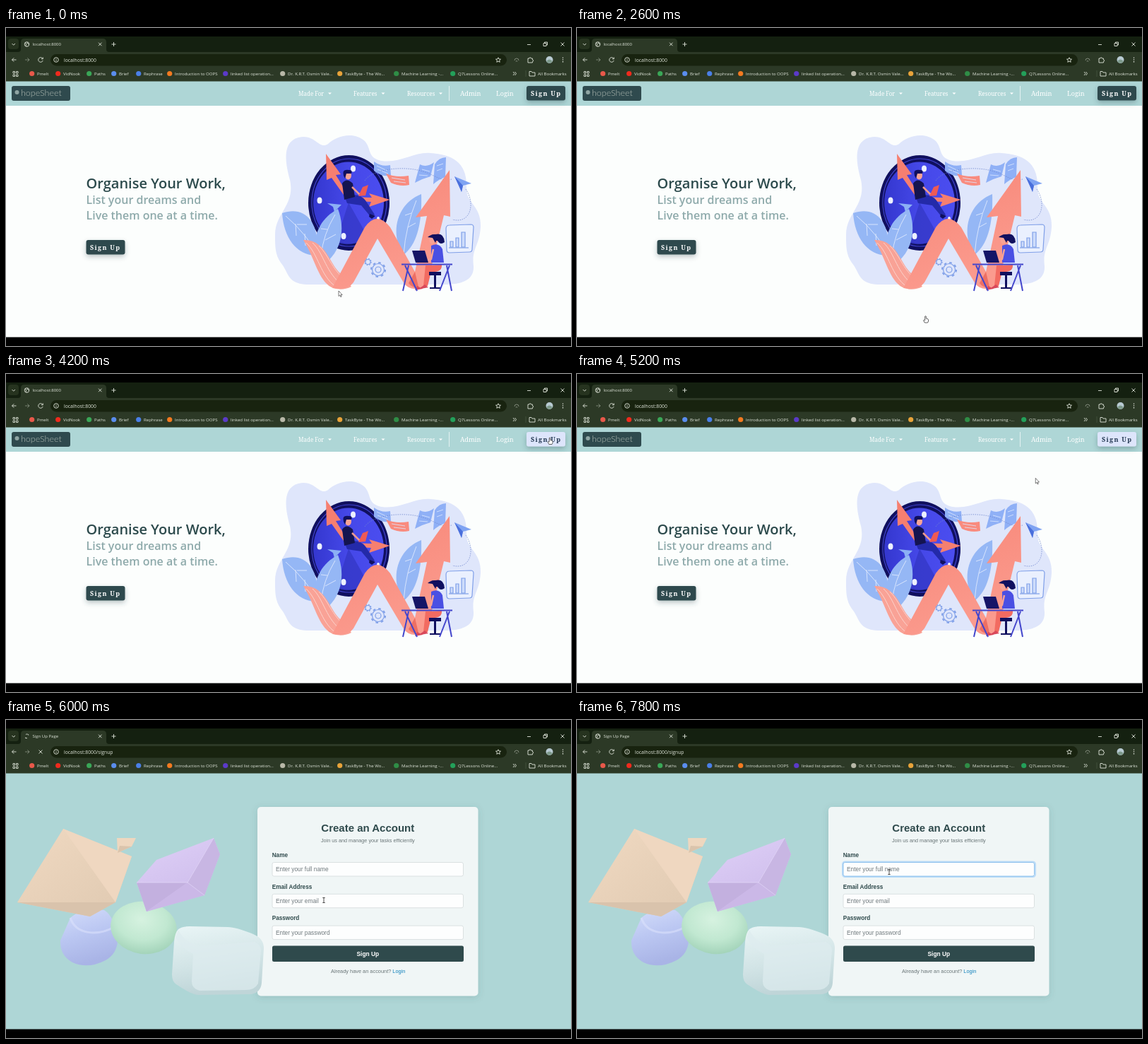
Recreate the animation shown at these times as an HTML page. Size 800 by 450 pixels, loop 8 s.

```html
<!DOCTYPE html>
<html lang="en">
<head>
<meta charset="utf-8">
<title>Sign up walkthrough</title>
<style>
html, body { margin: 0; width: 100%; height: 100%; overflow: hidden; background: #000; }
svg { display: block; width: 800px; height: 450px; }
text { white-space: pre; }
.ui { font-family: "Open Sans", "Noto Sans", sans-serif; font-size: 6.1px; fill: #dfe5da; }
.serif { font-family: "Noto Serif", serif; fill: #fff; }
.btn { font: 700 9px "Noto Serif", serif; letter-spacing: 1.3px; fill: #fff; }
.head { font-family: "Open Sans", "Noto Sans", sans-serif; font-weight: 600; }
.form { font-family: "Liberation Sans", Arial, sans-serif; }
.line { fill: none; stroke: #dfe5da; stroke-width: .9; }
</style>
</head>
<body>
<svg viewBox="0 0 800 450">
<defs>
  <filter id="shadow" x="-20%" y="-40%" width="140%" height="200%"><feDropShadow dx="0" dy="3" stdDeviation="3.5" flood-color="#2f4a4e" flood-opacity=".32"/></filter>
  <filter id="soft" x="-10%" y="-10%" width="120%" height="120%"><feDropShadow dx="0" dy="2" stdDeviation="5" flood-color="#35595b" flood-opacity=".18"/></filter>
  <linearGradient id="sand" x2="1" y2="1"><stop stop-color="#f0d9c1"/><stop offset="1" stop-color="#dfc9b1"/></linearGradient>
  <linearGradient id="lilac" x2=".5" y2="1"><stop stop-color="#dfd0f7"/><stop offset="1" stop-color="#cdbceb"/></linearGradient>
  <linearGradient id="blue" x2=".3" y2="1"><stop stop-color="#d3dcfa"/><stop offset=".5" stop-color="#bbc7f2"/><stop offset="1" stop-color="#a9b4e6"/></linearGradient>
  <radialGradient id="mint" cx=".45" cy=".35" r=".65"><stop stop-color="#d6f2e0"/><stop offset=".6" stop-color="#c1e8d1"/><stop offset="1" stop-color="#a4d4ba"/></radialGradient>
  <linearGradient id="ice" x2=".2" y2="1"><stop stop-color="#e9f5f6"/><stop offset=".6" stop-color="#d2e4e6"/><stop offset="1" stop-color="#bfd5d8"/></linearGradient>
  <linearGradient id="coral" x2=".4" y2="1"><stop stop-color="#f78576"/><stop offset="1" stop-color="#fb9b8e"/></linearGradient>
  <linearGradient id="face" x2="1" y2="0"><stop stop-color="#3437cf"/><stop offset=".5" stop-color="#4548e8"/><stop offset="1" stop-color="#4b4df0"/></linearGradient>
</defs>

<rect width="800" height="450"/>

<g id="home">
  <rect y="75" width="800" height="362.500" fill="#fcfefd"/>
  <rect y="75" width="800" height="35" fill="#aed6d6"/>
  <rect x="8" y="82" width="83" height="21" rx="3" fill="#2f4a4e"/>
  <circle cx="15.500" cy="91" r="3" fill="#8fa5a3"/>
  <text x="21" y="96" style="font:300 12.500px Lato,sans-serif;fill:#b3bdb5">hopeSheet</text>
  <g id="nav" class="serif"></g>
  <path d="M627.500 82V103" stroke="#e3f1f1"/>
  <g id="join"><rect x="737" y="82" width="55" height="20.500" rx="3" filter="url(#shadow)"/><text class="btn" x="743" y="95.500">Sign Up</text></g>

  <g class="head">
    <text x="113.500" y="227" font-size="20" fill="#2c4a4c">Organise Your Work,</text>
    <g font-size="16" fill="#8eaaab"><text x="113.500" y="249">List your dreams and</text><text x="113.500" y="271">Live them one at a time.</text></g>
  </g>
  <rect x="113.500" y="300" width="55" height="20.500" rx="3" fill="#2f4a4e" filter="url(#shadow)"/>
  <text class="btn" x="119" y="313.500">Sign Up</text>

  <path fill="#dfe6fb" d="M381 294C380 262 410 251 402 215C395 190 391 161 414 155C438 149 443 173 456 164C468 152 493 146 508 160C518 171 511 184 532 188C557 192 578 175 601 177C633 179 653 191 652 225C651 249 673 250 672 282C670 310 659 311 662 337C663 358 644 363 620 363H425C397 361 401 346 389 332C381 321 381 309 381 294Z"/>
  <g id="clock">
    <ellipse cx="485.500" cy="247.500" rx="57.500" ry="67.500" fill="#10105f"/>
    <ellipse cx="486" cy="247" rx="53" ry="62" fill="none" stroke="#4144cf" stroke-width="1.200"/>
    <ellipse cx="485" cy="247.500" rx="50" ry="58" fill="url(#face)"/>
    <path d="M485 247L467 304Q494 311 512 295Z" fill="#3033bd" opacity=".6"/>
    <g fill="#edf1ff"><ellipse cx="491.500" cy="199" rx="3.500" ry="4.500"/><ellipse cx="444" cy="244" rx="3.500" ry="4.500"/><ellipse cx="478" cy="294.500" rx="3.500" ry="4.500"/><ellipse cx="527" cy="270" rx="2" ry="3"/></g>
    <path d="M455 248L475 250L465 260L463 253Z" fill="#8cb0f5"/>
  </g>
  <!-- clock hands -->
  <path fill="#f67f70" d="M453 178L474 207L467 208L482 232L478 236L461 212L454 215ZM543.500 243L514 234L518 240L483 239V244L517 246L514 253Z"/>
  <!-- seated man -->
  <path d="M480 240Q498 231 509 244L522 264L517 268L503 251L483 248Z" fill="#242aa9"/>
  <path d="M515 263L523 266L518 270L514 267Z" fill="#10105f"/>
  <path d="M476 220Q482 211 491 220L494 239L479 243Z" fill="#141450"/>
  <path d="M490 225L500 235L508 234" fill="none" stroke="#f49a8d" stroke-width="2.500"/>
  <ellipse cx="484.500" cy="208.500" rx="4.500" ry="6" fill="#f8a395"/>
  <path d="M478 209Q475 199 486 201Q491 201 489 206L482 206L480 213Z" fill="#10105f"/>
  <path d="M505 225L513 222L509 237L499 238Z" fill="#ee5a55"/>

  <!-- sheets of paper -->
  <path fill="#8fb0f6" d="M521 189Q532 197 544 194L545 209Q532 211 521 202ZM586 193Q596 198 606 190L601 210Q590 213 579 219ZM607 193Q613 183 623 183L622 211Q613 214 605 221Z"/>
  <path fill="#f98b7e" d="M538 206Q552 212 570 209L571 222Q558 225 545 219Z"/>
  <path d="M525 195L540 202M526 200L541 206M589 200L600 203M585 208L597 209M610 195L619 192M610 202L618 199M546 212L565 215M549 217L566 219" fill="none" stroke="#dce7fe" stroke-width=".8"/>
  <path d="M508 216C520 198 567 195 590 203C610 209 616 218 631 214M651 228C665 248 658 278 632 271" fill="none" stroke="#7188cf" stroke-width=".8" stroke-dasharray="1.500 1.500"/>
  <path d="M635 210L659 220L647 223L645 232L641 222Z" fill="#7fa3f2"/><path d="M635 210L647 223L645 232Z" fill="#4a6fdc"/>

  <!-- leaves -->
  <g fill="#95b7f5" stroke="#e8effe" stroke-width=".8">
    <path stroke="none" d="M391 262C421 252 439 271 441 304L438 322C411 321 393 296 391 262Z"/>
    <path stroke="none" d="M470 256C481 285 475 317 449 335L437 319C435 288 448 268 470 256Z"/>
    <path stroke="none" d="M588 235C589 264 586 302 564 320C546 302 546 252 588 235Z"/>
    <path fill="none" d="M396 266Q425 290 449 332M466 264Q449 292 446 323M581 244Q566 281 563 320M410 277L411 294M423 291L424 308M412 278L426 278M455 285L446 284M452 300L467 292M574 262L565 265M569 282L580 276"/>
  </g>

  <!-- ribbon arrow -->
  <path fill="#f9a296" d="M421 300C437 299 449 309 457 324C463 334 468 344 476 349L489 366Q475 373 461 367C442 357 438 327 421 300Z"/>
  <path d="M425 304C442 319 445 351 467 366M434 304C450 318 453 348 477 364M443 308C459 324 462 345 485 359" fill="none" stroke="#fcd2cb" stroke-width="1"/>
  <path fill="url(#coral)" d="M462 368L508 282Q525 258 544 282L579 345L596 266L580 268L628 201L629 267L620 265L598 356Q592 369 578 369Q570 369 564 362L526 298L492 360Q486 369 470 369Z"/>
  <path d="M579 345L570 361Q576 369 584 366Z" fill="#ed6f64"/>

  <!-- gears and chart -->
  <g fill="none" stroke="#7f9fe8" stroke-width="1.200">
    <circle cx="527" cy="342" r="8.500"/><circle cx="527" cy="342" r="4"/>
    <circle cx="527" cy="342" r="10" stroke-dasharray="3.500 4.350" stroke-width="2"/>
    <circle cx="512.500" cy="331" r="3.500"/><circle cx="512.500" cy="331" r="4.600" stroke-dasharray="1.800 1.810"/>
    <path fill="#eaf0fe" d="M628 279L658 278Q662 278 662 282L660 313Q660 317 656 317L628 318Q624 318 624 314L623 284Q623 279 628 279Z"/>
    <path fill="#cddcfb" d="M629 302h4v8h-4zM637 297h4v13h-4zM645 289h5v21h-5z"/><path d="M627 311H655"/>
  </g>

  <!-- woman at the desk -->
  <path d="M602 301Q598 291 608 292Q620 289 621 303Q615 308 611 301Z" fill="#10105f"/>
  <ellipse cx="603.500" cy="300" rx="4" ry="5.500" fill="#f8a395"/>
  <path d="M597 296Q605 289 611 296L608 304L604 297Z" fill="#10105f"/>
  <path d="M602 308Q613 303 618 313L620 332H602Z" fill="#4a50e3"/>
  <path d="M605 313L602 327L592 329" fill="none" stroke="#f8a395" stroke-width="2.500"/>
  <path d="M617 335Q618 346 602 345L597 365H591L594 336Z" fill="#f26b61"/>
  <path d="M593 363L598 367L583 370ZM582 365L590 369L579 371Z" fill="#d9485a"/>
  <path d="M599 345H616V350H599ZM606 350h3v17h-3zM600 367H615V369H600Z" fill="#10105f"/>
  <path d="M575 315H593L598 332H580Z" fill="#151567"/>
  <path d="M560 334.500H632M570 336L562 372M624 336L631 372M565 336L582 372M628 336L614 372" fill="none" stroke="#4346cc" stroke-width="2"/>
</g>

<g id="signup" class="form">
  <rect y="75" width="800" height="362.500" fill="#aed6d6"/>
  <rect x="356" y="123" width="312.500" height="267.500" rx="5" fill="#f0f6f6" filter="url(#soft)"/>
  <path fill="url(#blue)" d="M91 280Q106 266 139 269Q154 278 158 312Q157 331 141 340Q116 353 94 343Q76 333 77 312Z"/>
  <path d="M91 280C99 304 130 306 153 293" fill="none" stroke="#dae1fc" stroke-width="3" opacity=".6"/>
  <ellipse cx="195" cy="294" rx="47" ry="37" fill="url(#mint)" transform="rotate(8 195 294)"/>
  <path fill="url(#sand)" d="M81 154L16 258L119 278L155 258L178 193Z"/>
  <path fill="#efd7c0" d="M81 154L178 193L155 258Z"/><path fill="#d9c3ac" d="M16 258L155 258L119 278Z"/>
  <path fill="#eed7bf" d="M157 167L184 167L178 179L158 188Z"/><path fill="#dac4ac" d="M158 188L161 178L178 179Z"/>
  <path fill="url(#lilac)" d="M185 230L213 198L294 167L303 190L281 248L199 271Z"/>
  <path fill="#c3b0df" d="M185 230L257 230L199 271Z"/><path fill="#cbb8e7" d="M257 230L281 248L199 271Z"/><path fill="#c8b6e3" d="M257 230L294 167L303 190L281 248Z"/>
  <path d="M185 230H257L294 167M257 230L281 248" fill="none" stroke="#e3d7f8" stroke-width=".7"/>
  <path fill="url(#ice)" d="M244 296Q249 292 260 292L314 293Q326 293 350 303Q365 309 365 323L362 372Q361 385 348 388L273 389Q263 389 241 374Q235 370 235 360L238 314Q239 301 244 296Z"/>
  <path fill="#deedef" opacity=".7" d="M244 297Q252 314 274 320L352 314Q361 318 361 326L357 373Q352 382 340 382L274 383Q263 380 263 370L265 331Q250 324 240 308Z"/>

  <g text-anchor="middle">
    <text x="512.300" y="157.500" font-size="15" font-weight="700" fill="#2f4a4c">Create an Account</text>
    <text x="512.300" y="173.300" font-size="7.270" fill="#697577">Join us and manage your tasks efficiently</text>
  </g>
  <g id="fields"></g>
  <rect x="377" y="319.500" width="271" height="22.500" rx="2.500" fill="#2f4a4c"/>
  <text x="512.300" y="333.500" text-anchor="middle" font-size="8.400" font-weight="700" fill="#fff">Sign Up</text>
  <text x="460" y="358.300" font-size="7.380" fill="#697577">Already have an account? <tspan fill="#1080bb">Login</tspan></text>
</g>

<!-- browser window -->
<g class="ui">
  <rect y="12" width="800" height="23" fill="#142010"/>
  <rect y="34" width="800" height="41.500" fill="#2c3926"/>
  <path d="M17 34Q21 34 21 30V20Q21 15 26 15H137Q142 15 142 20V30Q142 34 146 34Z" fill="#2c3926"/>
  <rect x="3" y="15" width="15" height="15" rx="4" fill="#26331f"/>
  <rect x="63" y="37" width="646" height="16.500" rx="8.200" fill="#18230f"/>
  <g class="line">
    <path d="M8.500 22L10.700 24.200L13 22M131 20.700l4.500 4.500m0-4.500l-4.500 4.500M149.500 23h6m-3-3v6M738 23.500h5M761 21.500h4v4h-4zM762.500 21.500v-1.500h4v4h-1.500M785.500 20.500l5 5m0-5l-5 5"/>
    <path d="M14.500 45h-6m2.700-2.700L8.500 45l2.700 2.700"/><path opacity=".45" d="M27 45h6m-2.700-2.700L33 45l-2.700 2.700"/>
    <circle cx="71" cy="45" r="3.300"/><path d="M71 44.500v2.200M71 43v.7M697 41.800l1 2.200 2.500.2-1.900 1.700.6 2.400-2.200-1.300-2.200 1.300.6-2.400-1.900-1.700 2.500-.2z"/>
    <path opacity=".5" d="M720 46a3 3 0 0 1 6 0M722 47.500a1 1 0 0 1 2 0"/>
    <path d="M739 43h2a1.200 1.200 0 0 1 2.400 0h2v2a1.200 1.200 0 0 1 0 2.400v1.600H739z"/>
    <path d="M718 62l2 2.500-2 2.500m2.500-5l2 2.500-2 2.500M741 61.500h3l1 1.500h4v5h-8z"/>
    <path d="M10 61.500h2.500v2.500H10zM14.500 61.500H17v2.500h-2.500zM10 66h2.500v2.500H10zM14.500 66H17v2.500h-2.500z"/>
    <path id="reload" d="M52 43.500a3.300 3.300 0 1 0 .2 2.500M52.300 41.500v2.300H50"/>
    <path id="stop" d="M46.500 42.500l5 5m0-5l-5 5"/>
    <g id="globe"><circle cx="29.500" cy="23" r="3.300"/><path d="M27 21l2 1.500-1 2 1.500 1.500M30 20l.5 2 2 1"/></g>
    <path id="spin" d="M26.500 23a3 3 0 0 1 3-3M32 24a3 3 0 0 1-2 2"/>
  </g>
  <path d="M788.500 41.500v7" stroke="#dfe5da" stroke-width="1.300" stroke-dasharray="1.300 1.500"/>
  <circle cx="769.500" cy="45" r="5" fill="#b9cbd3"/><path d="M765 47q4-5 9 0a5 5 0 0 1-9 0" fill="#7e9a8c"/>
  <text id="tab" x="37.500" y="25.300" font-size="6"></text>
  <text id="url" x="82" y="47.500" style="font-size:6.800px"></text>
  <path d="M736 60v9" stroke="#4d5947" stroke-width=".7"/>
  <text x="753" y="66.800">All Bookmarks</text>
  <g id="marks"></g>
</g>

<g id="cursor">
  <path id="arrow" d="M0 0V7.500L1.700 6L2.900 8.600L4 8.100L2.900 5.600H5.200Z" fill="#fff" stroke="#222" stroke-width=".6"/>
  <path id="hand" d="M-.8 .5Q0-.5 .8 .5V3.600Q4 3.600 4 5.500V7.500L3 9.500H-1.200L-3 6.200Q-2.600 5-.8 6.200Z" fill="#fff" stroke="#222" stroke-width=".7"/>
  <path id="beam" d="M-1.700-3.500H1.700M0-3.500V3.500M-1.700 3.500H1.700" fill="none" stroke="#222" stroke-width=".8"/>
</g>
</svg>

<script>
const $ = id => document.getElementById(id);
const show = (id, on) => $(id).style.display = on ? '' : 'none';

$('nav').innerHTML = [['Made For', 414, 8], ['Features', 492, 8.2], ['Resources', 568, 8.2], ['Admin', 643, 9.2], ['Login', 694, 9.1]]
  .map(([label, x, size]) => `<text x="${x}" y="95.5" font-size="${size}">${label}</text>`).join('') +
  [456, 531.5, 613].map(x => `<path d="M${x} 91.500h5l-2.500 2.500z"/>`).join('');

$('fields').innerHTML = [['Name', 'full name'], ['Email Address', 'email'], ['Password', 'password']]
  .map(([label, hint], i) => {
    const y = 201.5 + i * 44.8;
    return `<text x="376.700" y="${y - 7.7}" font-size="8.200" font-weight="700" fill="#2f4a4c">${label}</text>
      <rect id="glow${i}" x="376" y="${y - 1}" width="273" height="21.500" rx="3.500" fill="none" stroke="#bcdcf8" stroke-width="2" style="display:none"/>
      <rect id="box${i}" x="377" y="${y}" width="270.500" height="19.500" rx="2.500" fill="#fdfefe" stroke="#d3dadb" stroke-width=".8"/>
      <text x="382" y="${y + 12.8}" font-size="8.350" fill="#70797d">Enter your ${hint}</text>`;
  }).join('');

$('marks').innerHTML = [
  [44, '#e8584a', 'Pmelt'], [81, '#f02a1d', 'VidNook'], [125, '#3aa757', 'Paths'], [160, '#5a8dee', 'Brief'],
  [195, '#4a7fe8', 'Rephrase'], [239, '#f47a20', 'Introduction to OOPS'], [318, '#5b3ac8', 'linked list operation...'],
  [399, '#b8b8a8', 'Dr. K.R.T. Osmin Vale...'], [480, '#e8a33a', 'TaskByte - The Wo...'],
  [560, '#2f8d46', 'Machine Learning -...'], [640, '#23a05a', 'Q7Lessons Online...']
].map(([x, color, label]) => `<circle cx="${x - 7.3}" cy="64.500" r="3.600" fill="${color}"/><text x="${x}" y="66.800">${label}</text>`).join('');

// Pointer path: time, x, y
const path = [
  [0, 471, 372], [600, 471, 370], [1400, 562.5, 313.5], [1800, 544, 378], [2600, 493.5, 407.5], [3200, 493.5, 406],
  [4200, 770, 90], [4800, 770, 90], [5800, 427, 253], [6000, 450, 255], [6800, 450, 255], [7400, 442, 215], [8000, 442, 215]
];

function pointer(t) {
  const i = path.findIndex(p => p[0] > t);
  const [t0, x0, y0] = path[i - 1], [t1, x1, y1] = path[i];
  const k = (t - t0) / (t1 - t0), e = k * k * (3 - 2 * k);
  return [x0 + (x1 - x0) * e, y0 + (y1 - y0) * e];
}

function draw(now) {
  const t = Math.floor(now % 8000 / 200) * 200; // the screen refreshes five times a second
  const form = t >= 6000, moved = t >= 5600, loading = t >= 5400 && t < 6600;
  const hover = t >= 4200, focus = t >= 7200;
  show('home', !form);
  show('signup', form);
  $('join').children[0].setAttribute('fill', hover ? '#dde5fb' : '#2f4a4e');
  $('join').children[1].style.fill = hover ? '#20344f' : '#fff';
  $('tab').textContent = moved ? 'Sign Up Page' : 'localhost:8000';
  $('url').textContent = 'localhost:8000' + (moved ? '/signup' : '');
  show('reload', !loading);
  show('stop', loading);
  show('globe', !loading);
  show('spin', loading);
  $('spin').setAttribute('transform', `rotate(${(t - 5800) * .3} 29.5 23)`);
  show('glow0', focus);
  $('box0').setAttribute('stroke', focus ? '#78b5e8' : '#d3dadb');

  const shape = t >= 5800 ? 'beam' : t >= 800 && t < 5000 ? 'hand' : 'arrow';
  for (const id of ['arrow', 'hand', 'beam']) show(id, id === shape);
  $('cursor').setAttribute('transform', `matrix(1 0 0 1 ${pointer(t).join(' ')})`);
  requestAnimationFrame(draw);
}
requestAnimationFrame(draw);
</script>
</body>
</html>
```
